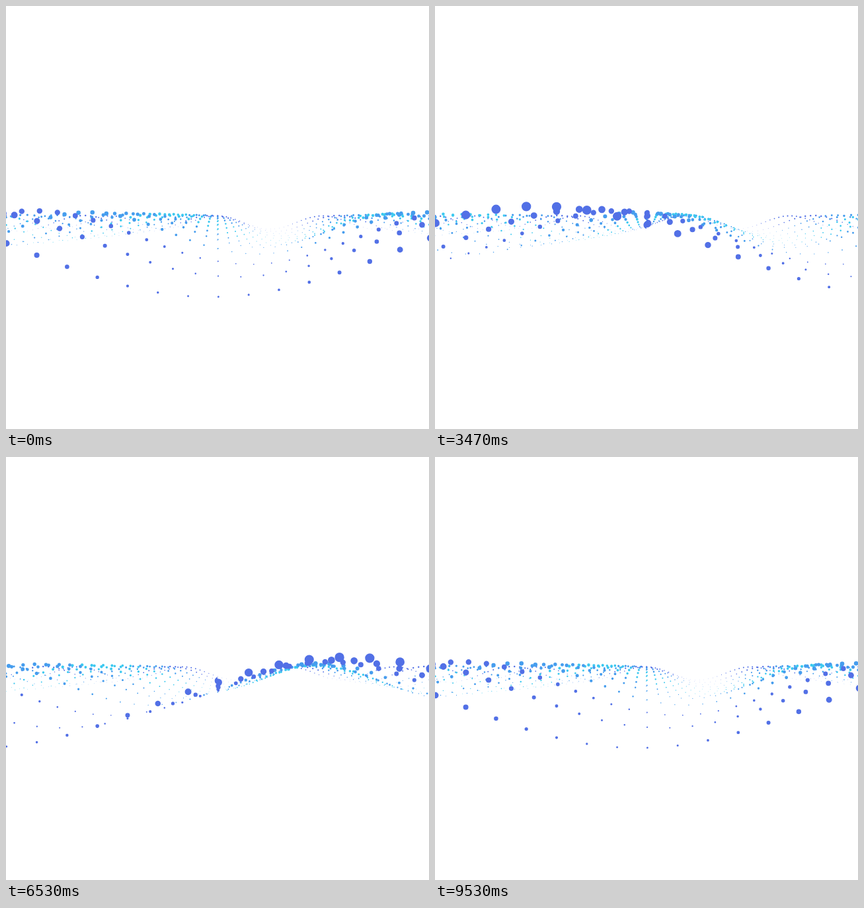
An HTML page with a canvas that plays this animation: 640 px wide and 640 px high, repeating every 9560 ms.

```html
<!DOCTYPE html>
<html lang="en">
<head>
<meta charset="utf-8">
<title>Dot wave</title>
<style>
  html, body { margin: 0; width: 100%; height: 100%; overflow: hidden; background: #fff; }
  canvas { display: block; }
</style>
</head>
<body>
<canvas id="stage" width="640" height="640"></canvas>
<script>
const ctx = document.getElementById('stage').getContext('2d');
const SIZE = 640, CENTER = 320, LOOP = 9560;
const WAVELENGTH = 24;   // in columns
const LEFT_LAG = 60;     // the left half trails by a moment, in ms
const ROWS = 13;

const PURPLE = '#5270e6', BLUE = '#469dee', CYAN = '#3dc9f0';
const rowColor = row =>
  row < 3 || row > 10 ? PURPLE : row < 6 || row > 8 ? BLUE : CYAN;

// Column spacing in pixels: steep near the viewer, then shrinking evenly.
const NEAR = [45.8, 34.27, 27, 21.1];
const spacing = row => NEAR[row] ?? (17 - row) * 4 / 3;

function drawRow(row, time, minX, maxX) {
  const s = spacing(row);
  const trough = row - 0.16 + WAVELENGTH * time / LOOP;
  const first = Math.floor((minX - CENTER) / s) - 1;
  const last = Math.ceil((maxX - CENTER) / s) + 1;
  ctx.fillStyle = rowColor(row);
  ctx.beginPath();
  for (let col = first; col <= last; col++) {
    const depth = Math.cos(2 * Math.PI * (col - trough) / WAVELENGTH);
    const x = CENTER + s * (col + 0.03);
    const y = CENTER + s * (1.125 + 1.496 * depth);
    const radius = s * (0.094 - 0.063 * depth);
    ctx.moveTo(x + radius, y);
    ctx.arc(x, y, radius, 0, 2 * Math.PI);
  }
  ctx.fill();
}

function drawHalf(minX, time) {
  const width = SIZE / 2;
  ctx.save();
  ctx.beginPath();
  ctx.rect(minX, 0, width, SIZE);
  ctx.clip();
  for (let row = ROWS - 1; row >= 0; row--) drawRow(row, time, minX, minX + width);
  ctx.restore();
}

function frame() {
  const time = performance.now() % LOOP;
  ctx.fillStyle = '#fff';
  ctx.fillRect(0, 0, SIZE, SIZE);
  drawHalf(0, time - LEFT_LAG);
  drawHalf(CENTER, time);
  requestAnimationFrame(frame);
}
frame();
</script>
</body>
</html>
```
